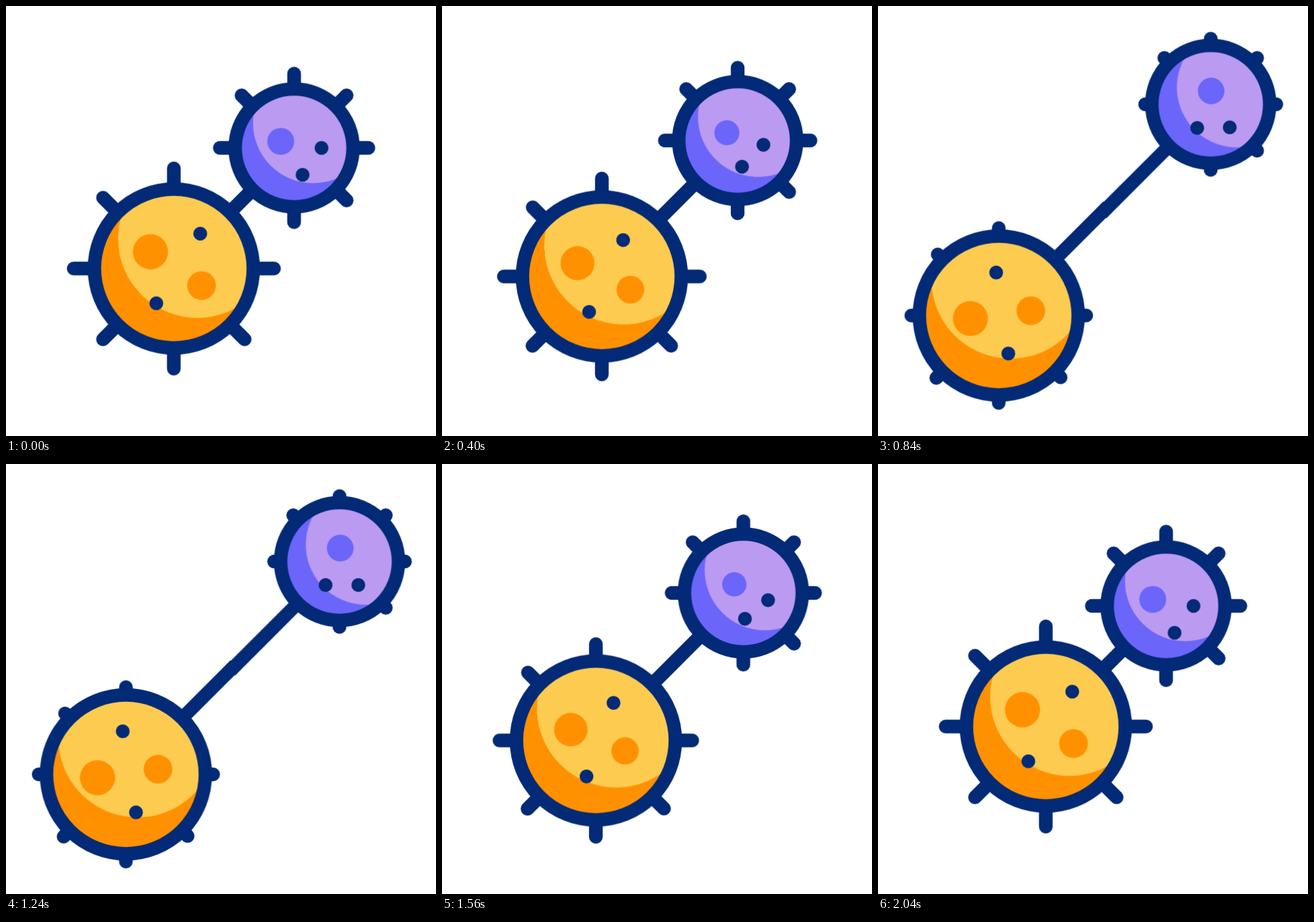
Recreate the animation shown at these times as an HTML page without scripts. Size 640 px wide and 640 px high, loop 2200 ms.

```html
<!DOCTYPE html>
<html lang="en">
<head>
<meta charset="utf-8">
<title>Two cells</title>
<style>
  html, body { margin: 0; width: 100%; height: 100%; overflow: hidden; background: #fff; }
  svg { display: block; width: 100vw; height: 100vh; }

  .navy { fill: #032a76; }
  .line { fill: none; stroke: #032a76; stroke-width: 20; }
  .spikes { stroke-linecap: round; stroke-width: 20.4; }

  /* --to: pose at the far end; --s: scale in mid travel */
  .go { animation: go 2200ms infinite cubic-bezier(.5, 0, .14, 1); }
  .pulse { animation: pulse 2200ms infinite cubic-bezier(.33, 0, .67, 1); }

  .amber { --to: translate(-71.6px, 71.5px); }
  .violet { --to: translate(67.9px, -66.3px); }
  .amber .spikes path { --to: translateY(var(--in, 19.3px)); }
  .violet .spikes path { --to: translateY(13.2px); }
  .amber .light { --to: rotate(-20.5deg); }
  .violet .light { --to: rotate(20deg); }
  .amber .spots { --to: rotate(-41.7deg); --s: .95; }
  .violet .spots { --to: rotate(55deg); --s: .9; }
  .amber .dot { --s: 1.0526; }
  .violet .dot { --s: 1.1111; }

  @keyframes go {
    0%, 9.0909% { transform: none; }
    45.4545%, 54.5455% { transform: var(--to); }
    90.9091%, 100% { transform: none; }
  }
  @keyframes pulse {
    0%, 9.0909% { transform: scale(1); }
    23.6364% { transform: scale(var(--s)); }
    41.8182%, 54.5455% { transform: scale(1); }
    69.0909% { transform: scale(var(--s)); }
    87.2727%, 100% { transform: scale(1); }
  }
</style>
</head>
<body>
<svg viewBox="0 0 640 640">
  <defs>
    <clipPath id="big"><circle r="110"/></clipPath>
    <clipPath id="small"><circle r="80"/></clipPath>
  </defs>

  <!-- the link: one half per cell, overlapping in the middle -->
  <g transform="translate(249.8 390.7)">
    <g class="go amber"><path class="line" d="M0 0L162.6-162.6"/></g>
  </g>
  <g transform="translate(428.8 211.2)">
    <g class="go violet"><path class="line" d="M0 0L-162.6 162.6"/></g>
  </g>

  <g transform="translate(249.8 390.7)">
    <g class="go amber">
      <g class="line spikes">
        <g><path class="go" d="M0 0V-149"/></g>
        <g transform="rotate(90)"><path class="go" d="M0 0V-149"/></g>
        <g transform="rotate(135)"><path class="go" d="M0 0V-149"/></g>
        <g transform="rotate(180)"><path class="go" d="M0 0V-149"/></g>
        <g transform="rotate(225)"><path class="go" style="--in:18px" d="M0 0V-149"/></g>
        <g transform="rotate(270)"><path class="go" d="M0 0V-149"/></g>
        <g transform="rotate(315)"><path class="go" style="--in:21px" d="M0 0V-149"/></g>
      </g>
      <g clip-path="url(#big)">
        <circle r="112" fill="#ff9100"/>
        <g class="go light"><circle cx="35" cy="-44.5" r="118" fill="#fdcb50"/></g>
      </g>
      <g transform="translate(1 0)">
        <g class="go spots">
          <g class="pulse">
            <circle cx="-35.8" cy="-25" r="26.2" fill="#ff9100"/>
            <circle cx="40.2" cy="25.3" r="21.4" fill="#ff9100"/>
            <g transform="translate(38.3 -51.9)"><circle class="pulse dot navy" r="10.3"/></g>
            <g transform="translate(-27.1 51.7)"><circle class="pulse dot navy" r="10.3"/></g>
          </g>
        </g>
      </g>
      <circle class="line" r="118.2"/>
    </g>
  </g>

  <g transform="translate(428.8 211.2)">
    <g class="go violet">
      <g class="line spikes">
        <g><path class="go" d="M0 0V-110.5"/></g>
        <g transform="rotate(45)"><path class="go" d="M0 0V-110.5"/></g>
        <g transform="rotate(90)"><path class="go" d="M0 0V-110.5"/></g>
        <g transform="rotate(135)"><path class="go" d="M0 0V-110.5"/></g>
        <g transform="rotate(180)"><path class="go" d="M0 0V-110.5"/></g>
        <g transform="rotate(270)"><path class="go" d="M0 0V-110.5"/></g>
        <g transform="rotate(315)"><path class="go" d="M0 0V-110.5"/></g>
      </g>
      <g clip-path="url(#small)">
        <circle r="82" fill="#6b65fa"/>
        <g class="go light"><circle cx="28.3" cy="-37" r="89.5" fill="#bb9af2"/></g>
      </g>
      <g transform="translate(.6 5.3)">
        <g class="go spots">
          <g class="pulse">
            <circle cx="-20.5" cy="-15" r="20" fill="#6b65fa"/>
            <g transform="translate(40.2 -5.3)"><circle class="pulse dot navy" r="10.3"/></g>
            <g transform="translate(12 34.7)"><circle class="pulse dot navy" r="10.3"/></g>
          </g>
        </g>
      </g>
      <circle class="line" r="87.7"/>
    </g>
  </g>
</svg>
</body>
</html>
```
